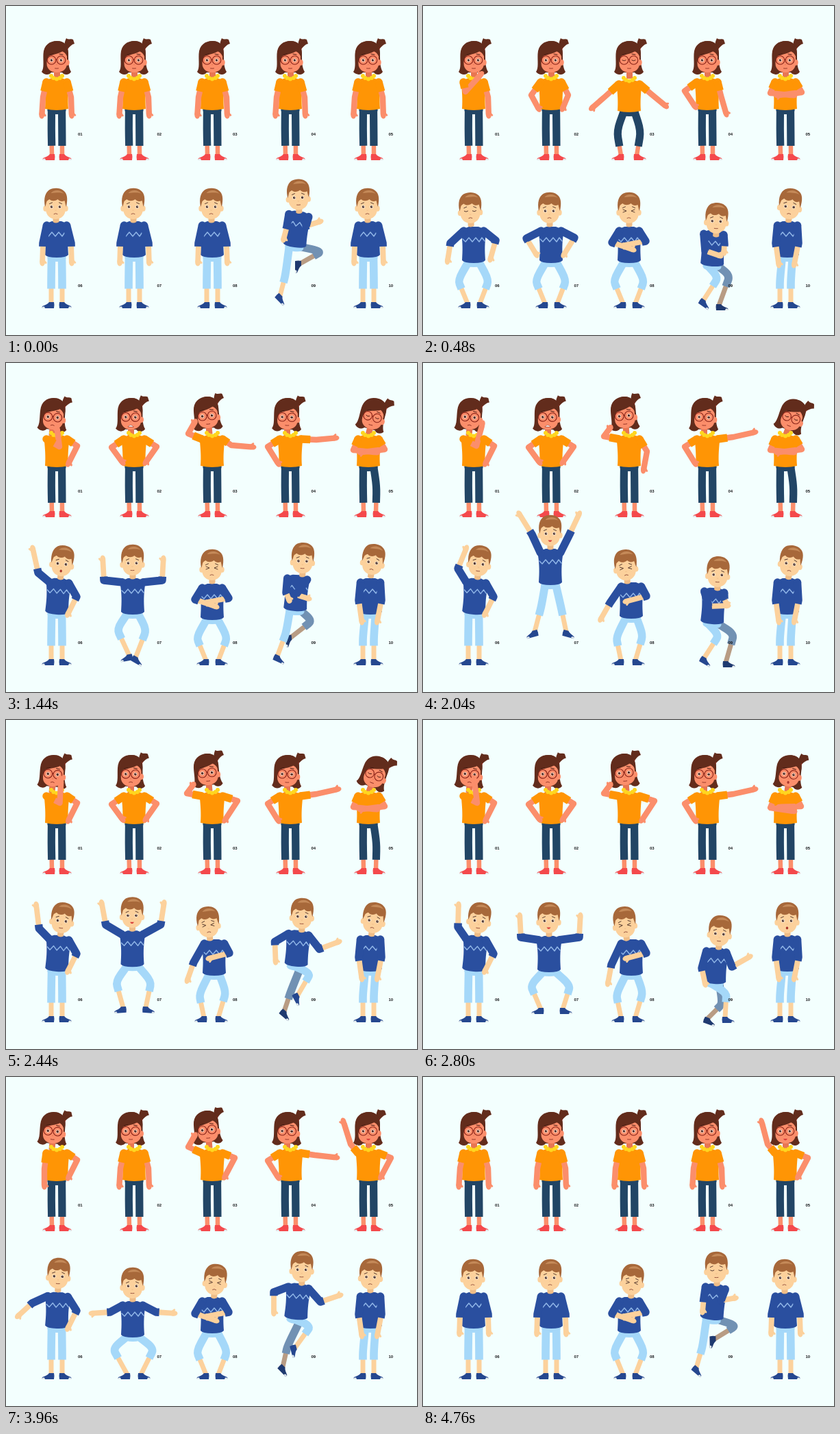
These frames come from a looping animation (600 by 480 pixels, 4.8 s). An HTML page:

```html
<!DOCTYPE html>
<html lang="en">
<head>
<meta charset="utf-8">
<title>Character poses</title>
<style>
html, body { margin: 0; width: 100%; height: 100%; overflow: hidden; background: #f3fffe; }
svg { display: block; width: 600px; height: 480px; }
text { font: bold 6px "Liberation Sans", Arial, sans-serif; fill: #1d1d1f; }
</style>
</head>
<body>
<svg id="stage" viewBox="0 0 600 480"><g id="cast"></g><g id="labels"></g></svg>
<script>
const LOOP = 4800, STEP = 40;

// Looks: proportions are relative to the hip centre
const girl = {
  skin: '#fb8e6b', shade: '#e87652', top: '#ff9505', pants: '#224565', shoe: '#f4494c',
  shoulder: [15, -40], neck: -51, arm: 8.4, sleeve: 11.5, leg: 6.5, trouser: 11.2, cuff: 0.63, cover: 0.62,
  torso: 'M-17-1C-16-15-17-25-18-37Q-15-44-7-46H7Q15-44 18-37C17-25 16-15 17-1Q0 3-17-1Z'
};
const boy = {
  skin: '#fcd19c', shade: '#efbd87', top: '#2a4f9f', pants: '#a5d8f9', shoe: '#25478f',
  shoulder: [14.5, -46], neck: -56, arm: 7.8, sleeve: 11.5, leg: 7, trouser: 11.6, cuff: 0.37, cover: 1.15,
  torso: 'M-17-3C-16-18-16-28-18-42Q-15-50-7-52H7Q15-50 18-42C16-28 16-18 17-3Q14 1 0 1Q-14 1-17-3Z'
};
const farSide = { skin: '#b89c84', pants: '#7191b3', shoe: '#1f3a70' };

// Pose: h hip x,y,lean; d head dx,dy,tilt; L,R elbow and hand; l,r knee, ankle, foot turn; e eyes; m mouth
const girlRest = {
  h: [0, 151, 0], d: [0, 0, 0], L: [-20, 133, -22, 164], R: [21, 133, 22, 164],
  l: [-7.8, 180, -7, 218, 0], r: [7.8, 180, 8, 218, 0], e: 'open', m: 'line'
};
const boyRest = {
  h: [0, 366, 0], d: [0, 0, 0], L: [-20, 346, -21, 379], R: [21, 346, 22, 379],
  l: [-8, 400, -8, 434, 0], r: [8, 400, 8, 434, 0], e: 'open', m: 'sad'
};
const hipR = [30, 121, 15, 151], hipL = [-33, 122, -15, 151];
const squat = { h: [0, 374, 0], d: [-1, -2, 0], l: [-23, 400, -9, 434, 0], r: [22, 400, 9, 434, 0] };
const armsUp = { L: [-44, 317, -46, 281], R: [41, 317, 43, 281] };
const apex = {
  h: [-1, 323, 0], L: [-28, 250, -49, 216], R: [27, 250, 43, 216],
  l: [-14, 354, -24, 392, 15], r: [14, 354, 22, 392, 15], m: 'smile'
};
const hug = { L: [-25, 345, 10, 357], R: [24, 343, -13, 350] };
const stride = {
  h: [6, 351, 8], d: [0, 1, -2], L: [-5, 322, -11, 345], R: [23, 321, 48, 313],
  l: [-7, 392, -15, 423, 45], r: [46, 358, 14, 376, 90], m: 'line'
};

const cast = [
  { x: 74, look: girl, keys: [
    [0, girlRest],
    [480, { L: [-12, 125, 14, 96] }],
    [800, { L: [4, 122, 0, 91], R: hipR, d: [-7, 0, 5], m: 'sad' }],
    [1440, {}],
    [2040, { L: [4, 121, 14, 84] }],
    [2800, { L: [5, 121, 0, 81] }],
    [3200, { L: [4, 121, 12, 85] }],
    [3560, { L: [4, 122, 0, 91] }],
    [3920, { L: [-18, 134, -18, 164], m: 'line' }],
    [4000, {}],
    [4360, girlRest]] },
  { x: 187, look: girl, keys: [
    [0, girlRest],
    [480, { L: [-29, 130, -16, 154], R: [25, 130, 15, 154] }],
    [760, { L: [-33, 123, -14, 149], R: [33, 122, 14, 149], d: [-5, 0, 1], m: 'teeth' }],
    [2480, { m: 'sad' }],
    [3540, { m: 'line' }],
    [3900, { L: girlRest.L, R: girlRest.R }],
    [4000, {}],
    [4360, girlRest]] },
  { x: 301, look: girl, keys: [
    [0, girlRest],
    [480, { h: [0, 154, 0], d: [0, -3, 0], L: [-35, 132, -58, 152], R: [34, 130, 57, 149],
            l: [-18, 182, -12, 218, 0], r: [17, 182, 11, 218, 0], e: 'shut' }],
    [820, { ...girlRest, L: [-35, 103, -23, 82], R: [28, 120, 64, 123], d: [-5, -2, -5] }],
    [1560, {}],
    [2040, { L: [-37, 107, -25, 91], R: [26, 129, 20, 161] }],
    [2400, { R: [37, 118, 16, 150] }],
    [3300, {}],
    [3760, { L: [-35, 102, -23, 81], R: [33, 118, 16, 150] }],
    [3980, {}],
    [4360, girlRest]] },
  { x: 415, look: girl, keys: [
    [0, girlRest],
    [480, { L: [-33, 124, -15, 151], R: [20, 131, 29, 162] }],
    [840, { L: hipL, R: [38, 112, 71, 109], d: [-5, 0, 2] }],
    [1440, {}],
    [2040, { R: [38, 108, 74, 100] }],
    [3300, {}],
    [3960, { R: [36, 114, 72, 118] }],
    [4360, girlRest]] },
  { x: 529, look: girl, keys: [
    [0, girlRest],
    [480, { L: [-22, 127, 17, 131], R: [24, 126, -16, 131] }],
    [1000, { h: [0, 151, 0], d: [1, 0, 6], r: [12, 180, 11, 218, 0] }],
    [1400, { d: [1, -1, 15], e: 'shut' }],
    [2040, { d: [2, 0, 20] }],
    [2440, {}],
    [2760, { d: [3, 0, 7], R: [23, 126, -14, 127], L: [-22, 128, 17, 134], r: girlRest.r, e: 'open', m: 'o' }],
    [3040, {}],
    [3480, { d: [0, 0, 0], L: [-26, 98, -36, 60], R: [33, 118, 16, 150], m: 'smile' }],
    [3720, { L: [-26, 98, -31, 59] }],
    [3960, { L: [-26, 98, -38, 60] }],
    [4360, { L: [-26, 98, -30, 59] }],
    [4760, { L: [-26, 98, -36, 60] }]] },
  { x: 74, look: boy, keys: [
    [0, boyRest],
    [480, { ...squat, d: [-3, -2, -2], L: [-34, 346, -39, 377], R: [32, 342, 23, 374], e: 'shut' }],
    [840, { ...boyRest, h: [0, 366, 4], d: [3, 0, 7], L: [-27, 306, -36, 266], R: [29, 341, 14, 371], m: 'o' }],
    [1440, {}],
    [2040, { L: [-23, 300, -9, 266], m: 'line' }],
    [2560, { L: [-26, 305, -34, 266] }],
    [2800, { L: [-23, 302, -22, 265] }],
    [3080, { L: [-23, 300, -11, 266] }],
    [3480, { L: [-27, 306, -34, 266] }],
    [3840, { h: [0, 366, 2], d: [1, -2, 3], L: [-38, 328, -70, 336] }],
    [3960, { L: [-36, 330, -60, 352] }],
    [4180, { ...squat, h: [0, 370, 0], L: [-31, 346, -35, 377] }],
    [4480, boyRest]] },
  { x: 187, look: boy, keys: [
    [0, boyRest],
    [480, { ...squat, L: [-36, 339, -19, 367], R: [34, 338, 16, 367] }],
    [840, { h: [-2, 378, 0], L: [-35, 341, -62, 345], R: [32, 341, 60, 345], m: 'line' }],
    [1440, { ...armsUp, h: [-2, 366, 0], d: [1, -1, 0], l: [-25, 388, -7, 427, 10], r: [18, 389, 2, 430, 30] }],
    [2040, apex],
    [2640, { ...armsUp, h: [-3, 372, 0], l: [-31, 391, -13, 430, 0], r: [29, 391, 15, 430, 0] }],
    [2800, { h: [-3, 367, 0], l: [-30, 387, -15, 422, 0], r: [28, 387, 17, 422, 0] }],
    [3240, apex],
    [3680, { ...armsUp, h: [-3, 372, 0], l: [-30, 392, -10, 434, 0], r: [28, 392, 10, 434, 0], m: 'line' }],
    [3960, { h: [-2, 379, 0], L: [-35, 343, -66, 345], R: [32, 343, 63, 345],
             l: [-31, 396, -10, 434, 0], r: [29, 396, 10, 434, 0] }],
    [4200, { ...squat, L: [-36, 339, -19, 367], R: [34, 338, 16, 367] }],
    [4480, boyRest]] },
  { x: 301, look: boy, keys: [
    [0, boyRest],
    [440, { ...squat, ...hug, d: [1, -2, 0], e: 'tight' }],
    [1640, {}],
    [2040, { h: [3, 372, 0], d: [-5, 0, -5], L: [-28, 350, -44, 378], R: [25, 340, -9, 349],
             l: [-19, 400, -12, 434, 0], r: [20, 397, 9, 434, 0] }],
    [2800, { L: [-26, 357, -32, 389], d: [-6, 0, -6] }],
    [3280, { ...squat, ...hug, h: [0, 373, 0], d: [4, 0, 5] }],
    [3960, {}],
    [4360, { d: [5, -1, 7] }],
    [4760, { d: [4, 0, 5] }]] },
  { x: 415, look: boy, far: true, period: 1600, blink: [4640, 4800], keys: [
    [0, stride],
    [440, { h: [7, 380, 4], d: [5, 2, 3], L: [2, 355, 34, 354], R: [25, 344, 30, 356],
            l: [17, 397, -5, 431, 30], r: [39, 395, 27, 437, 0] }],
    [480, { h: [7, 379, 3], d: [4, 8, 3], L: [-3, 357, 23, 366], R: [25, 348, 24, 364],
            l: [16, 396, -6, 430, 35], r: [33, 393, 17, 437, 0] }],
    [760, { h: [8, 353, 5], d: [5, 1, 1], L: [-24, 314, -24, 349], R: [44, 328, 77, 317],
            l: [30, 363, 7, 395, 75], r: [-4, 392, -11, 423, 45] }],
    [1200, { h: [10, 384, 4], d: [4, 1, 5], L: [-8, 362, -2, 390], R: [36, 360, 66, 343],
             l: [28, 398, 26, 435, 0], r: [22, 414, 0, 436, 20] }],
    [1440, { h: [7, 361, 4], d: [8, 1, 2], L: [-6, 335, 0, 350], R: [8, 338, 31, 345],
             l: [-6, 393, -19, 428, 25], r: [32, 376, 0, 401, 85] }],
    [1600, stride]] },
  { x: 529, look: boy, keys: [
    [0, boyRest],
    [460, { h: [3, 366, 0], d: [3, 0, 6], L: [-14, 346, -9, 382], R: [19, 346, 12, 382] }],
    [1440, { d: [2, -2, 9] }],
    [2040, { d: [3, 0, 9] }],
    [2440, {}],
    [2760, { d: [1, 0, 0], m: 'o' }],
    [3300, { m: 'sad' }],
    [3960, { d: [1, -1, 2] }],
    [4400, boyRest]] }
];

const mix = (a, b, k) => a.map((v, i) => v + (b[i] - v) * k);
const onBody = (h, x, y) => {
  const a = h[2] * Math.PI / 180, c = Math.cos(a), s = Math.sin(a);
  return [h[0] + x * c - y * s, h[1] + x * s + y * c];
};
const shoulder = (look, h, side) => onBody(h, side * look.shoulder[0], look.shoulder[1]);
const near = (a, ref) => a + Math.round((ref - a) / (2 * Math.PI)) * 2 * Math.PI;

// Arms are stored as angles and lengths so that they swing in arcs
function polar([sx, sy], [ex, ey, hx, hy], prev) {
  const p = [Math.atan2(ex - sx, ey - sy), Math.hypot(ex - sx, ey - sy),
             Math.atan2(hx - ex, hy - ey), Math.hypot(hx - ex, hy - ey)];
  if (prev) for (const i of [0, 2]) p[i] = near(p[i], prev[i]);
  return p;
}

for (const c of cast) {
  let last = {};
  c.keys = c.keys.map(([t, change]) => {
    const p = { ...last, ...change };
    p.armL = polar(shoulder(c.look, p.h, -1), p.L, last.armL);
    p.armR = polar(shoulder(c.look, p.h, 1), p.R, last.armR);
    p.t = t;
    return last = p;
  });
}

function poseAt(c, time) {
  const t = c.period ? time % c.period : time, ks = c.keys;
  let i = ks.length - 1;
  while (ks[i].t > t) i--;
  const a = ks[i], b = ks[i + 1] || a;
  let k = a === b ? 0 : (t - a.t) / (b.t - a.t);
  if (!c.period) k = k * k * (3 - 2 * k);
  const p = {};
  for (const f of ['h', 'd', 'l', 'r', 'armL', 'armR']) p[f] = mix(a[f], b[f], k);
  const face = b.t - t <= 80 ? b : a;
  p.e = c.blink && time >= c.blink[0] && time < c.blink[1] ? 'shut' : face.e;
  p.m = face.m;
  return p;
}

const n = v => +v.toFixed(2);
const at = p => p.map(n).join();
const fill = (d, color) => `<path d="${d}" fill="${color}"/>`;
const stroke = (d, color, w, cap = 'round') =>
  `<path d="${d}" fill="none" stroke="${color}" stroke-width="${w}" stroke-linecap="${cap}" stroke-linejoin="round"/>`;
const line = (pts, ...style) => stroke('M' + pts.map(at).join('L'), ...style);
// Two segments whose joint is rounded off by the share k
const bend = (a, b, c, k, ...style) =>
  stroke(`M${at(a)}L${at(mix(b, a, k))}Q${at(b)} ${at(mix(b, c, k))}L${at(c)}`, ...style);
const dot = (x, y, r, color, ry = r) => `<ellipse cx="${n(x)}" cy="${n(y)}" rx="${r}" ry="${ry}" fill="${color}"/>`;
const group = (x, y, a, inner) => `<g transform="translate(${n(x)} ${n(y)})rotate(${n(a)})">${inner}</g>`;

function arm(look, s, [a1, l1, a2, l2]) {
  const e = [s[0] + Math.sin(a1) * l1, s[1] + Math.cos(a1) * l1];
  const w = [e[0] + Math.sin(a2) * l2, e[1] + Math.cos(a2) * l2];
  const hand = dot(0, -5.5, 4, look.skin, 6) + stroke('M1-9L5-4.5', look.skin, 2.8);
  const cover = look.cover;
  const sleeve = cover < 1 ? [s, mix(s, e, cover)] : [s, e, mix(e, w, cover - 1)];
  return line([s, e, mix(e, w, 0.78)], look.skin, look.arm) +
    group(w[0], w[1], -a2 * 180 / Math.PI, hand) +
    dot(s[0], s[1], look.sleeve / 2, look.top) +
    line(sleeve, look.top, look.sleeve, 'butt');
}

function leg(look, h, side, [kx, ky, fx, fy, turn], toe) {
  const hip = onBody(h, side * 7.5, -1), knee = [kx, ky], foot = [fx, fy];
  const shoe = fill('M-4-2H3C5 1 9 2 13 4Q14 6 13 7H-4Q-5 2-4-2Z', look.shoe) +
    fill('M10 4.6Q14 4 14 7H9Z', '#e3ebee');
  return line([mix(knee, foot, 0.3), foot], look.skin, look.leg) +
    `<g transform="translate(${n(fx)} ${n(fy)})scale(${toe} 1)rotate(${n(turn)})">${shoe}</g>` +
    bend(hip, knee, mix(knee, foot, look.cuff), 0.45, look.pants, look.trouser, 'butt');
}

function eyes(kind, xs, y, color) {
  return xs.map((x, i) => {
    const s = i ? 1 : -1;
    if (kind === 'shut') return stroke(`M${x - 2.6} ${y}q2.6 2 5.2 0`, color, 0.9);
    if (kind === 'tight') return stroke(`M${x + s * 2.5} ${y - 2}l${-s * 5} 2l${s * 5} 2`, color, 0.9);
    return dot(x, y, 2.5, '#fff4e6') + dot(x, y, 1.8, color) + dot(x + 0.6, y - 0.6, 0.5, '#fff');
  }).join('');
}

function mouth(kind, x, y, color) {
  if (kind === 'o') return dot(x, y, 1.7, '#a8352c', 2);
  if (kind === 'teeth') return fill(`M${x - 4} ${y + 2}q4-5 8 0z`, '#fff') + stroke(`M${x - 4} ${y + 2}q4-5 8 0z`, color, 0.6);
  if (kind === 'smile') return fill(`M${x - 3} ${y - 1}h6q-3 5-6 0z`, '#d8413c');
  return stroke(`M${x - 2.5} ${y}q2.5 ${kind === 'sad' ? -1.8 : 0.4} 5 0`, color, 0.9);
}

function girlHead(p) {
  const hair = '#622c1c', dark = '#4a1d15', frame = '#8a2419', xs = [-7.5, 6.5];
  return fill('M11-40C11-45 12-49 14-53C18-50 21-53 24-51L26-45C22-44 19-41 16-37Z', hair) +
    stroke('M12-41L15.5-37.5', '#ee3f3d', 2.4) +
    fill('M-8-3C-11 1-18 1-22-4C-18-9-20-20-19.5-30C-19-43-10-49 0-49C11-49 17-43 17-31C17-20 17-10 21-4C18 1 11 1 8-3Z', hair) +
    fill('M-4-8H5V6H-4Z', girl.shade) +
    dot(15.5, -17.5, 3.2, girl.skin, 4.2) +
    fill('M-14.5-28V-16C-14.5-7-7-3 0-3C7-3 15-7 15-16V-28C10-38-10-38-14.5-28Z', girl.skin) +
    fill('M-17-14C-21-36-11-49 1-49C13-49 19-38 16-23C15-28 13-31 9-34C2-30-7-29-11-27C-14-24-14-18-17-14Z', hair) +
    stroke('M-10-29l5-1M4-30l5 1', dark, 1) +
    eyes(p.e, xs, -21, dark) +
    xs.map(x => `<circle cx="${x}" cy="-21" r="6.3" fill="none" stroke="${frame}" stroke-width="1.1"/>`).join('') +
    stroke('M-1.2-22h1.4', frame, 1.1) +
    stroke('M-1-14.5q.8 1 1.8 0', girl.shade, 0.9) +
    mouth(p.m, 0, -9, '#8e3022');
}

function boyHead(p) {
  const hair = '#a7683a', dark = '#4b3028';
  const inner = fill('M-4-8H5V5Q0 8-4 5Z', boy.shade) +
    dot(-15, -14.5, 3.2, boy.skin, 4.2) + dot(15, -14.5, 3.2, boy.skin, 4.2) +
    fill('M-14.5-28V-14C-14.5-4-7 1 0 1C7 1 14.5-4 14.5-14V-28Z', boy.skin) +
    fill('M-15.5-17C-18-30-15-38-9-42C-3-45 6-45 11-41C17-37 18-29 15.5-17C14-20 14-23 13-26C9-24 6-25 3-28C-1-25-6-25-9-28C-11-27-12-26-13-25C-14-22-14-20-15.5-17Z', hair) +
    fill('M-7-37C-3-42 7-43 12-36C6-39 0-37-7-37Z', '#c58a59') +
    stroke('M-9-21.5l4-1.7M9-21.5l-4-1.7', dark, 0.9) +
    eyes(p.e, [-6, 6], -17, dark) +
    stroke('M-1-12q1 1 2 0', boy.shade, 0.9) +
    mouth(p.m, 0, -6.5, '#8f4a38');
  return group(-1.5, 0, 0, inner);
}

function person(c, time) {
  const p = poseAt(c, time), look = c.look, h = p.h, isGirl = look === girl;
  const neck = onBody(h, 0, look.neck);
  const rear = c.far ? { ...look, ...farSide } : look;
  const body = fill(look.torso, look.top) +
    (isGirl ? '' : stroke('M-16-34l4 4 5-6 5 6 5-6 5 6 4-6 4 5', '#91b7e8', 1.4));
  const collar = [[-8, -49], [-4.7, -46], [0, -44.6], [4.7, -46], [8, -49]]
    .map(([x, y]) => dot(x, y, 3, '#ffd61f')).join('');
  return `<g transform="translate(${c.x} 0)">` +
    leg(rear, h, 1, p.r, 1) +
    leg(look, h, -1, p.l, c.far ? 1 : -1) +
    group(h[0], h[1], h[2], fill('M-13.5-5H13.5V2Q12 7 0 7Q-12 7-13.5 2Z', look.pants) + body) +
    group(neck[0] + p.d[0], neck[1] + p.d[1], p.d[2], isGirl ? girlHead(p) : boyHead(p)) +
    (isGirl ? group(h[0], h[1], h[2], collar) : '') +
    arm(look, shoulder(look, h, -1), p.armL) +
    arm(look, shoulder(look, h, 1), p.armR) + '</g>';
}

const castLayer = document.getElementById('cast');
document.getElementById('labels').innerHTML = cast.map((c, i) => {
  const x = [105, 220.5, 331, 445.5, 558.5][i % 5];
  return `<text x="${x}" y="${i < 5 ? 189 : 410}">${String(i + 1).padStart(2, '0')}</text>`;
}).join('');

let shown = -1;
function draw() {
  const time = Math.floor(performance.now() % LOOP / STEP) * STEP;
  if (time !== shown) {
    castLayer.innerHTML = cast.map(c => person(c, time)).join('');
    shown = time;
  }
  requestAnimationFrame(draw);
}
draw();
</script>
</body>
</html>
```
